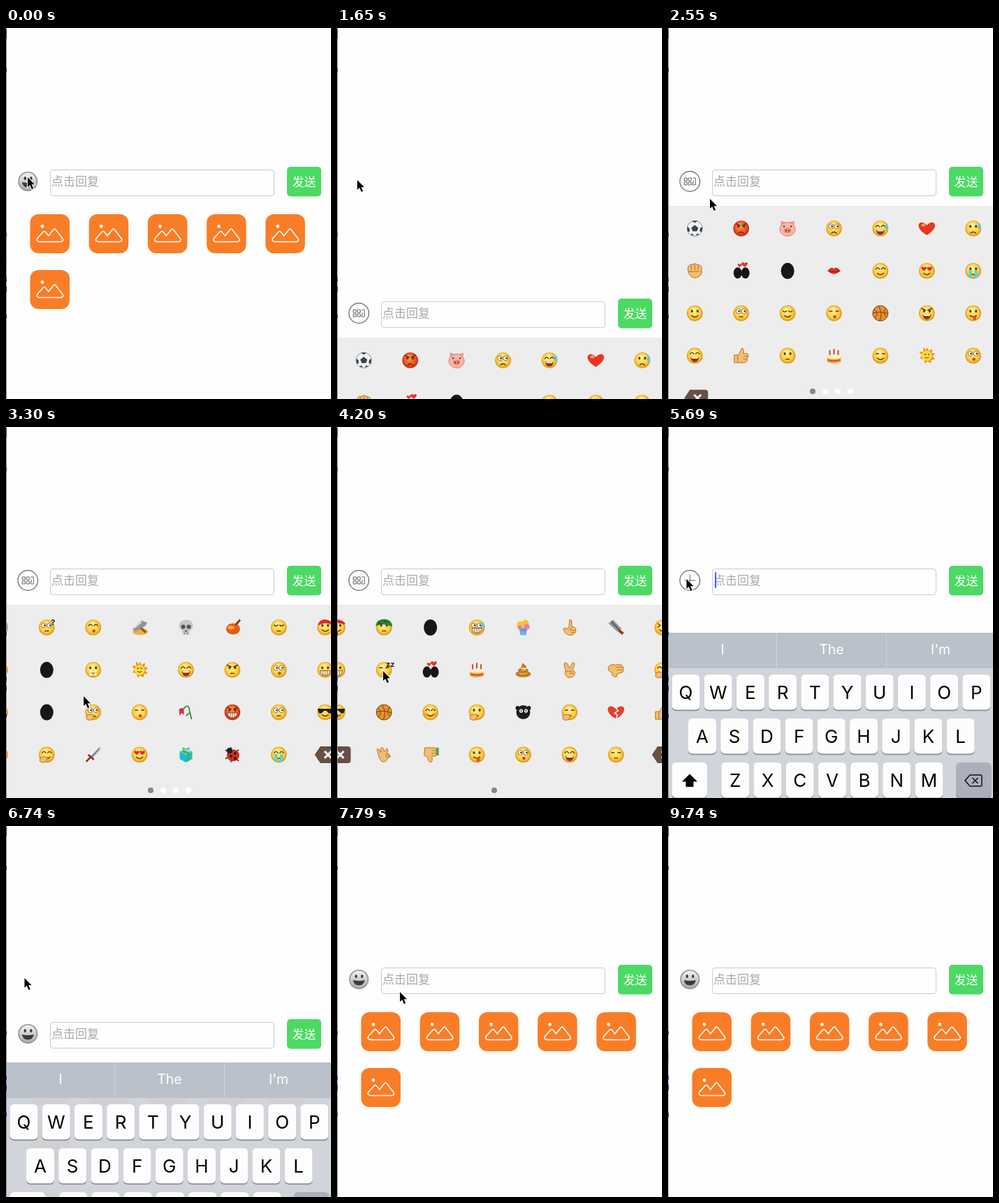
An HTML page with a canvas for the animation above (9.84 s loop, 465 by 532 pixels).

```html
<!DOCTYPE html>
<html lang="zh">
<head>
<meta charset="utf-8">
<title>Reply bar</title>
<style>
html, body { margin: 0; width: 100%; height: 100%; overflow: hidden; background: #fefefe; }
canvas { display: block; }
</style>
</head>
<body>
<canvas id="stage" width="465" height="532"></canvas>
<script>
const g = document.getElementById('stage').getContext('2d');
const LOOP = 9840;
const CJK = '17px "Noto Sans CJK SC", "Noto Sans CJK", sans-serif';
const latin = size => `${size}px Inter, sans-serif`;

// The screen only refreshes in bursts: [first, last, count]
const bursts = [[600, 1200, 5], [1500, 1950, 4], [2550, 3450, 7], [3600, 4490, 7], [4790, 5240, 4],
  [5540, 6290, 6], [6590, 7190, 5], [7640, 8540, 7], [8840, 9440, 5]];
const pointer = [[0, 31, 214], [600, 30, 218], [900, 39, 243], [1200, 29, 218], [2400, 29, 218],
  [2550, 60, 245], [2850, 260, 370], [3000, 290, 388], [3300, 111, 386], [3450, 111, 386],
  [3748, 250, 375], [3897, 265, 366], [4193, 66, 350], [4342, 75, 330], [4490, 97, 296],
  [4640, 97, 296], [5090, 23, 226], [5240, 26.5, 218], [7490, 26.5, 218], [7790, 90, 238],
  [8390, 377, 50], [8540, 377, 22], [8690, 377, 22], [8990, 437, 170], [9440, 190, 545]];
const barDrop = [[1350, 0], [1500, 277], [1650, 189], [1800, 40], [1950, 0],
  [6440, 0], [6590, 10], [6740, 78], [6890, 160], [7040, 30], [7190, 0]];
const keysDrop = [[5540, 150], [5690, 40], [5840, 8], [5990, 0], [6440, 0], [6590, 12], [6740, 84], [6890, 230], [7040, 320]];
const scrollKeys = [[2850, 0], [3000, 25], [3150, 210], [3300, 445], [3450, 465],
  [3749, 465], [3897, 485], [4045, 690], [4193, 901], [4342, 925], [4490, 930]];

function snap(t) {
  let s = 0;
  for (const [a, b, n] of bursts)
    for (let i = 0; i < n; i++) {
      const at = a + (b - a) * i / (n - 1);
      if (at <= t) s = at;
    }
  return s;
}

function track(keys, t, k = 1) {
  const i = keys.findIndex(key => key[0] > t);
  if (i === 0) return keys[0][k];
  if (i < 0) return keys[keys.length - 1][k];
  const a = keys[i - 1], b = keys[i];
  return a[k] + (b[k] - a[k]) * (t - a[0]) / (b[0] - a[0]);
}

// Drawing helpers
const o = (x, y, r, ry = r) => `M${x - r} ${y}a${r} ${ry} 0 1 0 ${2 * r} 0a${r} ${ry} 0 1 0 ${-2 * r} 0Z`;
function shape(color, d, width) {
  const p = new Path2D(d);
  if (width) {
    g.strokeStyle = color;
    g.lineWidth = width;
    g.stroke(p);
  } else {
    g.fillStyle = color;
    g.fill(p);
  }
}
function box(x, y, w, h, r, fill, stroke) {
  g.beginPath();
  g.roundRect(x, y, w, h, r);
  if (fill) { g.fillStyle = fill; g.fill(); }
  if (stroke) { g.strokeStyle = stroke; g.lineWidth = 1; g.stroke(); }
}
function text(s, x, y, color, font, align = 'center') {
  g.font = font;
  g.fillStyle = color;
  g.textAlign = align;
  g.fillText(s, x, y);
}
function at(x, y, draw) {
  g.save();
  g.translate(x, y);
  draw();
  g.restore();
}
const layers = list => list.forEach(l => shape(...l));

// Emoticons: a face is eyes + mouth + extras, everything else is a list of layers
const INK = '#6b3407', TAN = '#f3bd72', TANLINE = '#b9731f';
const heart = (x, y, s) => `M${x} ${y + s}C${x - 2.2 * s} ${y - s * .3} ${x - s} ${y - 1.6 * s} ${x} ${y - s * .5}C${x + s} ${y - 1.6 * s} ${x + 2.2 * s} ${y - s * .3} ${x} ${y + s}Z`;
const hand = (d, ...lines) => [[TAN, d], [TANLINE, d, 1], ...lines.map(l => [TANLINE, l, 1])];
const dots = o(-4, -3, 1.6, 2) + o(4, -3, 1.6, 2);
const eyes = {
  d: [[INK, dots]],
  w: [['#fff', o(-4, -3, 3.5) + o(4, -3, 3.5)], [INK, o(-4, -3, 3.5) + o(4, -3, 3.5), .7], [INK, o(-3, -3, 1.4) + o(5, -3, 1.4)]],
  c: [[INK, 'M-7-2Q-4-7-1-2M1-2Q4-7 7-2', 1.4]],
  u: [[INK, 'M-7-4Q-4 0-1-4M1-4Q4 0 7-4', 1.4]],
  s: [[INK, 'M-7-3h5M2-3h5', 1.5]],
  a: [[INK, dots], [INK, 'M-8-7L-1-4M8-7L1-4', 1.6]],
  h: [['#e5261f', heart(-4, -3, 3) + heart(4, -3, 3)]],
  x: [[INK, 'M-7-6l4 3l-4 3M7-6l-4 3l4 3', 1.4]],
  g: [['#1c1c1c', 'M-11-5H11L9 1Q5 3 2-2H-2Q-5 3-9 1Z']]
};
const mouths = {
  s: [[INK, 'M-5 3Q0 8 5 3', 1.4]],
  f: [[INK, 'M-4 7Q0 3 4 7', 1.4]],
  l: [[INK, 'M-3 5h6', 1.4]],
  k: [['#c4441c', o(1, 5, 2.2)]],
  o: [['#8d3510', 'M-6 2H6Q5 9 0 9Q-5 9-6 2Z'], ['#fff', 'M-5 2H5L4 4H-4Z']],
  t: [['#fff', 'M-7 1H7Q6 8 0 8Q-6 8-7 1Z'], [INK, 'M-7 1H7Q6 8 0 8Q-6 8-7 1ZM-3 1V7M0 1V8M3 1V7', .8]],
  p: [[INK, 'M-5 3Q0 7 5 3', 1.4], ['#e84b3c', o(2, 7, 2.4, 3)]]
};
const extras = {
  T: [['#43d9ee', 'M-6-1h4V10h-4ZM2-1h4V10h-4Z']],
  D: [['#5fc5ee', 'M9-8Q14 0 9 1Q4 0 9-8Z']],
  X: [['#f5f0df', 'M-6 2l2-2L6 7L4 9ZM6 2L4 0L-6 7L-4 9Z']],
  B: [['#df2a24', 'M-10-5Q-6-13 2-11Q8-10 11-6L10-4Q0-9-10-3Z']],
  H: [['#2f7d2e', 'M-12-2Q-11-12 0-12Q11-12 12-1Q0-7-12-2Z'], ['#174d1a', 'M-8-7l4 2M0-10l4 3', 1.5]],
  N: hand('M-9 4Q-3 2 1 4L-1 10Q-7 13-10 9Z'),
  R: [['#f3843c99', o(-7, 3, 2.5) + o(7, 3, 2.5)]]
};
const penguin = [['#171717', o(0, 0, 9.5, 11.5)]];
const art = {
  soccer: [['#f1f1f1', o(0, 0, 11)], ['#8b9197', o(0, 0, 11), 1], ['#39424c', 'M0-5l5 4l-2 5h-6l-2-5ZM-4-11h8l-4 3ZM-11-2l3 1l1 5l-3 1ZM11-2l-3 1l-1 5l3 1ZM-6 9l2-2l3 3ZM6 9l-2-2l-3 3Z']],
  pig: [['#ee9b8c', 'M-10-11L-3-9L-9-3ZM10-11L3-9L9-3Z'], ['#f9b8a7', o(0, 1, 11, 10)], ['#d97c6d', o(0, 1, 11, 10), 1], ['#e58a7b', o(0, 3, 5.5, 4)], ['#7c3228', o(-2, 3, 1, 1.6) + o(2, 3, 1, 1.6) + o(-5, -3, 1.3) + o(5, -3, 1.3)]],
  heart: [['#e8361f', heart(0, 0, 9.5)], ['#ff9c72', o(-5, -5, 3, 2)]],
  broken: [['#e3402b', heart(0, 0, 9.5)], ['#fff', 'M0-6l3 4l-5 3l4 3l-2 5', 1.5]],
  lips: [['#d9332c', 'M-9 0Q-4-7 0-3Q4-7 9 0Q0 9-9 0Z'], ['#8c1512', 'M-9 0Q0 3 9 0', 1]],
  fist: hand('M-10-3Q-9-10-4-9Q0-12 4-9Q10-9 10-2Q11 9 0 10Q-9 9-10-3Z', 'M-5-8V-1M0-9V-1M5-8V-1M-9 1H7'),
  finger: hand('M0-11Q3-12 3-8V-1Q9-1 9 4Q8 11 0 11Q-8 9-9 2Q-7-1-3 2L-1-1Z', 'M3 1Q0 1 0 4M8 4H2M7 7H2'),
  victory: hand('M-8-9Q-5-12-3-8L0-2L4-10Q8-11 7-7L4 0Q9 2 7 7Q4 12-2 11Q-8 8-6 1Z', 'M-5 2Q0 1 4 3M0 5H5'),
  pinky: hand('M-11-4Q-8-9-1-7Q8-10 9-5Q12-4 10 0Q11 4 7 4L1 6Q3 11-2 10Q-6 9-6 4Q-12 2-11-4Z', 'M0-4H9M1 0H9'),
  ok: hand('M-10-8Q-7-10-5-3L-4-10Q-1-12 0-4L4-9Q7-8 4-1L9 1Q10 4 5 5Q4 11-3 10Q-8 5-10-8Z', o(5, 1, 2.5)),
  up: hand('M-10-1H-4L1-11Q5-10 3-3H9Q12 0 9 3Q10 9 5 10H-10Z', 'M-5-1V9M4 1H9M3 5H8'),
  down: [...hand('M-8-10H7Q11-8 9-4Q11 0 8 2H2Q4 10 0 11Q-3 10-4 4L-9 1Z', 'M2-6H8M2-2H8'), ['#57a64a', 'M8-10h4V1H8Z']],
  skull: [['#c5c6c3', 'M-10-3Q-9-11 0-11Q10-11 10-2Q10 3 5 5V10H-5V5Q-10 3-10-3Z'], ['#505252', o(-4, -1, 3) + o(4, -1, 3) + 'M0 3l2 3h-4Z'], ['#777', 'M-2 7V10M2 7V10', 1]],
  hammer: [['#eeb33b', o(1, 6, 11, 5)], ['#8a5a22', 'M1 0L9 7', 3], ['#8f9498', 'M-10 2L3-10L11-7L8-2L-6 6Z'], ['#d9dcde', 'M-8 1L3-8', 2]],
  paddle: [['#e45a17', o(1, 2, 10, 8)], ['#f9a145', o(-2, 0, 5, 3)], ['#8b3b15', 'M5-4L11-11', 3]],
  sun: [['#f0901b', 'M0-12l3 5l5-3l-1 6l5 1l-4 4l4 4l-6 1l0 5l-5-3l-4 3l-1-6l-6-1l3-5l-4-4l6-1l0-6l4 4Z'], ['#ffd83e', o(0, 0, 7.5)], [INK, o(-2.5, -2, 1) + o(2.5, -2, 1)], [INK, 'M-3 2Q0 5 3 2', 1]],
  rose: [['#2c8a35', 'M-5-3Q4-15 5-3L8 10M5 1L0 5', 1.7], ['#d62d42', 'M-10-4Q-6-8-3-4L-3 4L-6 1L-9 5Z']],
  sword: [['#a3adb2', 'M10-11L10-7L-2 6L-5 3Z'], ['#4b5357', 'M9-10L-3 4', 1], ['#8c2f25', 'M-10 10L-4 4M-7 0L1 7', 2.6]],
  gift: [['#23b7d8', 'M-9-5L0-9L9-5V6L0 11L-9 6Z'], ['#7ce0ef', 'M-9-5L0-9L9-5L0 0Z'], ['#47b52c', 'M-4-7L5-3V8L2 10V-1L-6-4ZM0-8Q-6-13-5-8ZM0-8Q6-13 5-8Z']],
  bug: [['#222', 'M-10-7L9 9M-10 6L9-7M-2-11V11', 1.4], ['#d42e1d', o(1, 1, 9, 8.5)], ['#222', o(-4, -6, 4) + o(-2, 2, 2) + o(4, -2, 2) + o(4, 5, 2)]],
  cup: [['#60b5e8', 'M-6 0H6L4 11H-4Z'], ['#f3c431', o(-4, -4, 5) + o(3, -6, 5)], ['#e87cae', o(5, -1, 4) + o(-5, 0, 3)], ['#8c72c9', 'M-4 4H5', 2]],
  cleaver: [['#8c949b', 'M-11-6L-4-11L8 2L2 6Z'], ['#454d55', 'M-7-9L5 4', 1.4], ['#9d371d', 'M4 4L10 9', 4]],
  cake: [['#f0b23b', 'M-10 0H10V9Q0 13-10 9Z'], ['#fff0cb', 'M-10 0Q0-5 10 0V3Q0 6-10 3Z'], ['#d7472f', 'M-6-1V-8M0-2V-10M6-1V-8M-9 6Q0 9 9 6', 2]],
  poop: [['#c47b1c', o(0, 6, 11, 4.5) + o(0, 1, 7.5, 4) + 'M-4-2Q-2-5-1-10Q6-6 4 0Z'], ['#f0b650', 'M-6 5Q0 7 6 4M-3 0Q1 2 4-1', 1.5]],
  basket: [['#e8912f', o(0, 0, 11)], ['#79410f', o(0, 0, 11) + 'M-11 0Q0-4 11 1M-3-11Q4 0-1 11M-9-6Q-1 0-8 7M8-8Q2 0 9 6', 1]],
  lamb: [['#1d1d1d', o(0, 0, 10) + o(-8, -6, 3) + o(8, -6, 3)], ['#fff', o(-3, -2, 2.6) + o(4, -2, 2.6)], ['#111', o(-3, -2, 1) + o(4, -2, 1)]],
  peng: penguin,
  pair: [['#171717', o(-5, 3, 6, 8) + o(6, 3, 6, 8)], ['#e8332f', heart(5, -9, 3.5) + heart(-2, -8, 2.5)]],
  del: [['#675044', 'M-17 0L-9-12H13Q17-12 17-8V8Q17 12 13 12H-9Z'], ['#eee', 'M-3-5L7 5M7-5L-3 5', 3]]
};
const pages = [
  'soccer !af pig wf coD heart dfD fist pair peng lips cs hs dfT ds wl us sk basket ao dp co up dl cake ss sun wk del',
  'wlQ ck hammer skull paddle ul dsB peng dlX sun co al wk dt peng wfN sk rose !at wl gs csN sword hs gift bug cfT del',
  'dlH peng wtD cup finger cleaver xp slZ pair cake poop victory pinky coN basket csR dlN lamb slN broken up ok down dp wk co sl del'
].map(p => p.split(' '));

function face(code) {
  const red = code[0] === '!';
  if (red) code = code.slice(1);
  const fill = g.createRadialGradient(-2, -5, 1, 0, 0, 11.5);
  const tones = red ? ['#ff9a55', '#ea4f22', '#b32510'] : ['#fff2a0', '#f9cd3c', '#d78e17'];
  tones.forEach((c, i) => fill.addColorStop([0, .72, 1][i], c));
  shape(fill, o(0, 0, 11.3));
  layers(eyes[code[0]]);
  layers(mouths[code[1]]);
  for (const e of code.slice(2)) {
    if (extras[e]) layers(extras[e]);
    else text(e === 'Q' ? '?' : 'zz', 9, -4, '#222', 'bold 11px Inter, sans-serif');
  }
}

function emojiPanel(top, scroll, page) {
  g.fillStyle = '#ededed';
  g.fillRect(1, top, 464, 532);
  pages.forEach((items, p) => items.forEach((name, i) => {
    const x = 38.3 + 66.4 * (i % 7) + 465 * p - scroll + (name === 'del' ? 2 : 0);
    if (x < -30 || x > 495) return;
    at(x, top + 32.5 + 60.8 * Math.floor(i / 7), () => art[name] ? layers(art[name]) : face(name));
  }));
  for (let i = 0; i < 4; i++)
    if (i === page || !page) shape(i === page ? '#868686' : '#fff', o(207 + 18 * i, top + 266, 4));
}

function picturePanel(top) {
  for (let i = 0; i < 6; i++) {
    at(34.5 + 84.2 * (i % 5), top + 12 + 80 * Math.floor(i / 5), () => {
      box(0, 0, 56.5, 56, 12, '#f97d26');
      shape('#fff', o(17.5, 17.5, 2.4));
      shape('#fff', 'M13 39.5Q8 38.5 10.5 34.5L18.5 25.5Q20.3 23.5 22 25.5L26.3 31L33.5 22Q35 20 36.5 22L46.5 35Q48.5 38.5 44 39.5Z', 1.6);
    });
  }
}

function modeIcon(mode) {
  if (mode === 'pictures') {
    const fill = g.createLinearGradient(0, -13, 0, 13);
    fill.addColorStop(0, '#f4f4f4');
    fill.addColorStop(1, '#a9a9a9');
    shape(fill, o(0, 0, 13.3));
    shape('#929292', o(0, 0, 13.2), 1.6);
    shape('#3b3b3b', o(-4, -4.5, 1.7, 2.5) + o(4.5, -4.5, 1.7, 2.5) + 'M-8.5 1Q0 3 8.5 1Q7 8.5 0 8.5Q-7 8.5-8.5 1Z');
    return;
  }
  shape('#666', o(0, 0, 14.3), 1.2);
  shape('#666', mode === 'keys' ? 'M-8 0H8M0-8V8'
    : 'M-8-5h4v4h-4ZM-2-5h4v4h-4ZM4-5h4V5h-4V2h1V-1M-8 1h4v4h-4ZM-2 1h4v4h-4Z', 1);
}

function bar(y, mode, caret) {
  at(31.3, y + 220, () => modeIcon(mode));
  box(63.5, y + 203.5, 320, 37, 3.5, '#fefefe', '#cbcbcb');
  text('点击回复', 65, y + 226, '#a8a8a8', CJK, 'left');
  if (caret) box(67, y + 208, 2.2, 23, 1, '#426bea');
  box(402, y + 199, 49, 42.5, 5, '#4cd964');
  text('发送', 426.5, y + 226.5, '#fff', CJK);
}

function key(x, y, w, label, fill = '#fdfdfd', size = 26) {
  box(x, y + 1.3, w, 51, 6, '#898c92');
  box(x, y, w, 50.5, 6, fill);
  text(label, x + w / 2, y + 25.5 + size * .365, '#000', latin(size));
}

function keyboard(top) {
  const gray = '#abb0bc';
  g.fillStyle = 'rgba(208,211,218,.96)';
  g.fillRect(1, top, 464, 320);
  g.fillStyle = '#bac1ca';
  g.fillRect(1, top, 464, 51);
  g.fillStyle = '#d0d4da';
  g.fillRect(155, top, 1, 51);
  g.fillRect(312, top, 1, 51);
  ['I', 'The', "I'm"].forEach((w, i) => text(w, 78 + 156 * i, top + 31, '#fff', latin(19.5)));
  [['QWERTYUIOP', 5.5], ['ASDFGHJKL', 29], ['ZXCVBNM', 76.3]].forEach(([row, x], r) =>
    [...row].forEach((c, i) => key(x + 46.2 * i, top + 60 + 63 * r, 40, c)));
  key(5.5, top + 186, 50.5, '');
  key(412, top + 186, 50.5, '', gray);
  at(31, top + 212, () => shape('#000', 'M0-9.5L11 1.5H5.5V9H-5.5V1.5H-11Z'));
  at(437, top + 212, () => shape('#111', 'M-12 0L-5-8H10Q12-8 12-6V6Q12 8 10 8H-5ZM-1.5-4L6.5 4M6.5-4L-1.5 4', 1.5));
  key(5.5, top + 249, 50.5, '123', gray, 20);
  key(62, top + 249, 50.5, '', gray);
  at(87, top + 274, () => shape('#111', o(0, 0, 11) + o(0, 0, 5, 11) + 'M-11 0H11', 1.4));
  key(119, top + 249, 227, 'space', '#fdfdfd', 20);
  key(352, top + 249, 110.5, 'return', gray, 20);
}

function edge(late) {
  const spot = (c, y, h) => { g.fillStyle = c; g.fillRect(0, y, 1, h); };
  spot(late ? '#a9a9a9' : '#8a8a8a', 0, 532);
  spot('#4a2f1c', 2, 13);
  spot('#222', 58, 5);
  spot('#222', 294, 5);
  spot('#8d8a45', 325, 13);
  spot('#23238c', 358, 6);
  spot('#16168a', 371, 8);
  spot('#16168a', 411, 6);
}

function draw(t) {
  const s = snap(t);
  const mode = s < 1500 || s >= 6590 ? 'pictures' : s < 5540 ? 'emoji' : 'keys';
  const drop = track(barDrop, s);
  g.fillStyle = '#fefefe';
  g.fillRect(0, 0, 465, 532);
  if (mode === 'emoji') emojiPanel(255 + drop, track(scrollKeys, s), s < 3450 ? 0 : s < 4490 ? 1 : 2);
  if (mode === 'pictures') picturePanel(255 + drop);
  bar(drop, mode, mode === 'keys' && s < 6290);
  if (s >= 5540 && s < 7040) keyboard(255 + track(keysDrop, s));
  edge(t >= 9740);
  at(track(pointer, s, 1), track(pointer, s, 2), () => {
    const arrow = 'M0 0V14L3.2 11L5.8 17L8.2 16L5.6 10.3H10Z';
    shape('#fff', arrow, 2);
    shape('#000', arrow);
  });
}

const start = performance.now();
function tick() {
  draw((performance.now() - start) % LOOP);
  requestAnimationFrame(tick);
}
tick();
</script>
</body>
</html>
```
